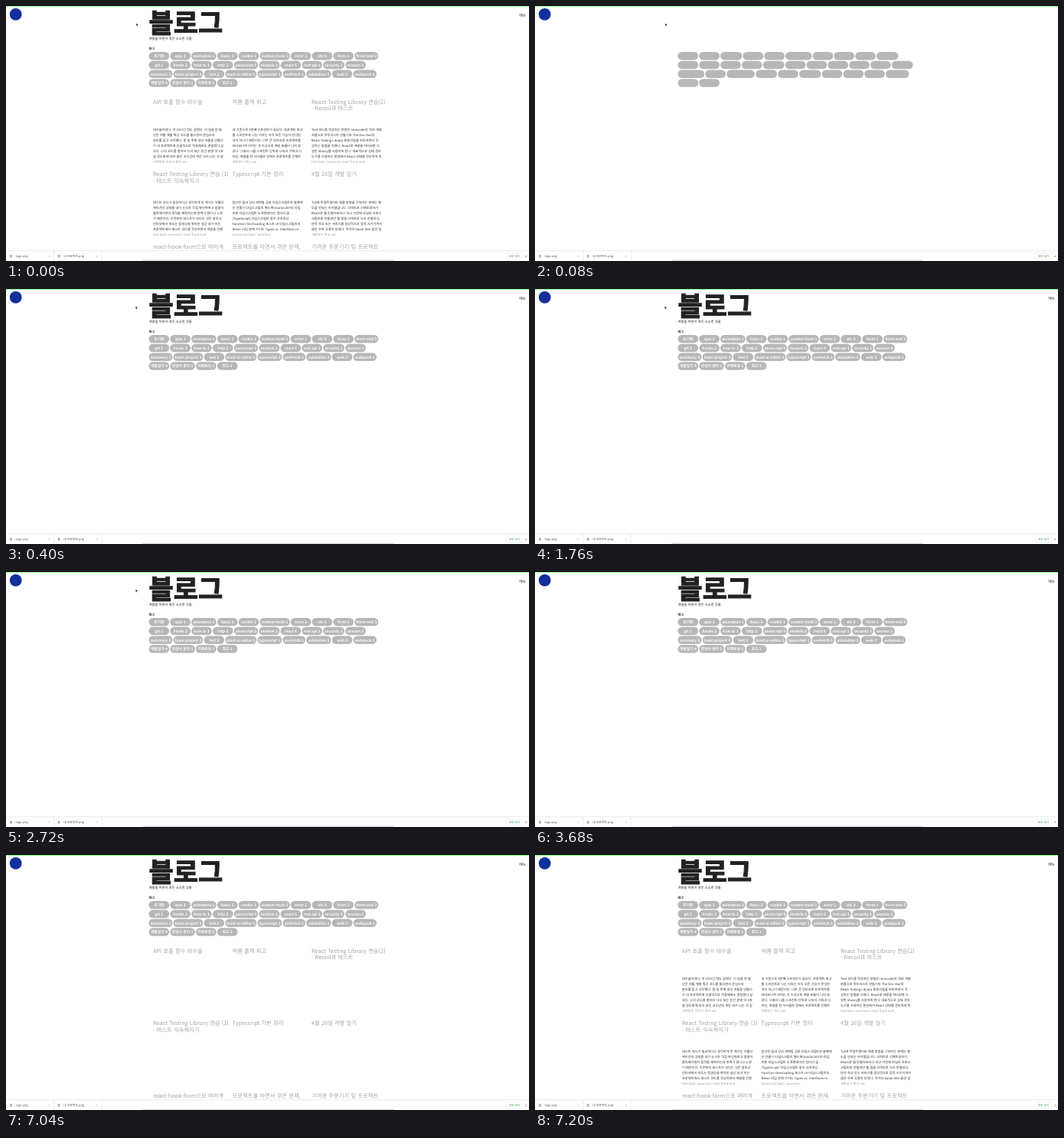
Write an HTML page that moves like this. It is 683 by 333 pixels and loops after 7.52 s.

```html
<!DOCTYPE html>
<html lang="ko">
<head>
<meta charset="utf-8">
<title>블로그</title>
<style>
html, body { margin: 0; width: 100%; height: 100%; overflow: hidden; background: #fff; }
svg { display: block; width: 683px; height: 333px; }
text {
  font-family: "Noto Sans CJK KR", "Noto Sans KR", "Noto Sans CJK", sans-serif;
  text-rendering: geometricPrecision;
  white-space: pre;
}
</style>
</head>
<body>
<svg id="stage" viewBox="0 0 683 333"></svg>
<script>
const LOOP = 7520, STEP = 80;
const columns = [192, 295.5, 399];

const rows = [
  ['초기화', 'ajax 3', 'animation 1', 'basic 3', 'cookie 1', 'custom hook 1', 'error 1', 'etc 8', 'form 1', 'front-end 3'],
  ['git 1', 'hooks 2', 'how to 1', 'http 2', 'javascript 9', 'module 2', 'react 6', 'rest api 1', 'security 1', 'session 1'],
  ['summary 3', 'team project 3', 'test 2', 'toast ui editor 1', 'typescript 1', 'useFetch 1', 'validation 2', 'web 3', 'webpack 1'],
  ['개발일기 4', '관심사 분리 1', '리팩토링 1', '회고 1']
];
// Pill widths by row and index; all others have the minimum width.
const loadedWidths = [
  { 2: 32.6, 5: 39.2, 9: 31.1 },
  { 4: 31.5, 5: 27.1, 8: 28 },
  { 0: 31, 1: 38.8, 3: 41, 4: 32, 5: 29.5, 6: 32.6, 8: 30.4 },
  { 1: 32.6 }
];
const fallbackCounts = [10, 11, 10, 2];
const fallbackWidths = [
  { 2: 28.3, 5: 34.4, 9: 28.4 },
  { 4: 28, 10: 27.8 },
  { 0: 34.8, 2: 36.8, 3: 28, 5: 28.5, 9: 30.5 },
  {}
];

const looseTitles = [
  [['API 호출 함수 대수술'], ['여름 플젝 회고'], ['React Testing Library 연습(2)', '- Recoil과 테스트']],
  [['React Testing Library 연습 (1)', '- 테스트 익숙해지기'], ['Typescript 기본 정리'], ['4월 26일 개발 일기']],
  [['react-hook-form으로 여러개'], ['프로젝트를 하면서 겪은 문제,'], ['가까운 주문기기 팀 프로젝트']]
];
const tightTitles = [
  [['API 호출 함수 대수술'], ['여름 플젝 회고'], ['React Testing Library 연습(2) -', 'Recoil과 테스트']],
  [['React Testing Library 연습 (1) -', '테스트 익숙해지기'], ['Typescript 기본 정리'], ['4월 26일 개발 일기']],
  [['react-hook-form으로 여러개의', '폼'], ['프로젝트를 하면서 겪은 문제,'], ['가까운 주문기기 팀 프로젝트 시']]
];

const bodies = [
  [`대수술이었다. 약 10시간 정도 걸렸다. 이 일을 한 발
단은 여름 개발 특강 코드를 들으면서 관심사의
분리를 듣고 시작했다. 할 일 목록 생성 어플을 만들다
가 내 프로젝트에 단골적으로 적용해봐도 괜찮겠다 싶
었다. 나의 코드를 열어서 다시 보는 순간 분명 약 1개
월 정도밖에 되지 않은 코드인데 썩은 내가 나는 것 같
리팩토링 관심사 분리 set`,
`내 기준으로 3번째 스프린트가 끝났다. 프로젝트 회고
를 스프린트로 나눈 이유는 아직 모든 기능이 완성된
것이 아니기 때문이다. 너무 큰 덩어리로 프로젝트를
바라보니까 지치는 것 이상으로 개발 효율이 나지 않
았다. 그래서 나름 스프린트 단위로 나눠서 기획과 디
자인, 개발을 한 사이클로 정해서 프로젝트를 진행하
개발일기 회고 set`,
`Test 코드를 작성하는 방법은 minicode의 TDD 개발
흐름으로 투두리스트 만들기와 The Dev Owl의
React Testing Library 튜토리얼을 따라하면서 작
성하는 방법을 익혔다. React로 개발을 하다보면 다
양한 library를 사용하게 된다. 대표적으로 상태 관리
도구를 사용하는 환경에서 React 상태를 관리하게 된
test basic summary react front-end`],
  [`테스트 코드가 필요하다고 생각하게 된 계기는 어플리
케이션의 상태를 내가 눈으로 직접 확인하며고 일일이
클릭해가면서 동작을 예측하는데 한계가 왔다고 느꼈
기 때문이다. 이전부터 테스트가 있다는 것은 알았고
인터넷에서 떠도는 동영상을 봤지만 실상 내가 하는
프로젝트에서 테스트 코드를 작성하면서 개발을 진행
test basic summary react front-end`,
`참고한 글과 강의 새벽빛 공방 타입스크립트로 블록체
인 만들기 타입스크립트 핸드북(marlon2075) 타입
추론 타입스크립트 도큐멘테이션 정리의 글
(TypeScript) 타입스크립트 함수 오버로딩 :
Function Overloading 포스트 UI 타입스크립트의
Never 타입 완벽 가이드 Types vs. Interfaces in
typescript basic summary`,
`TLDR 주절주절이라 해결 방법을 구하려는 분께는 별
도움 안되는 아이템입니다. 리액트로 리팩토링하기
React로 웹 만들어보라고 하고 이전에 바닐라 자바스
크립트로 만들었던 웹 앱을 리액트로 다시 만들었다.
만약 하고 있는 서비스를 정상적으로 동작 시키기까지
많은 우여 곡절이 있었다. 쿠키와 Same Site 옵션 일
개발일기 회고 set`]
];

const stage = document.getElementById('stage');

function add(parent, tag, attrs, content) {
  const el = document.createElementNS('http://www.w3.org/2000/svg', tag);
  for (const key in attrs) el.setAttribute(key, attrs[key]);
  if (content) el.textContent = content;
  return parent.appendChild(el);
}
const group = () => add(stage, 'g', {});
const rect = (g, x, y, width, height, fill, more) => add(g, 'rect', { x, y, width, height, fill, ...more });
const line = (g, d, stroke, width = .6) => add(g, 'path', { d, stroke, fill: 'none', 'stroke-width': width });
const label = (g, x, y, size, content, fill, weight = 400, anchor = 'start') =>
  add(g, 'text', { x, y, fill, 'font-size': size, 'font-weight': weight, 'text-anchor': anchor }, content);

function drawPills(g, counts, widths, names) {
  counts.forEach((count, r) => {
    let x = 186.5;
    const y = 60.1 + r * 11.75;
    for (let i = 0; i < count; i++) {
      const w = widths[r][i] || 26.7;
      rect(g, x, y, w, 10.4, '#b7b7b7', { rx: 5.2 });
      if (names) label(g, x + w / 2, y + 6.95, 4.8, names[r][i], '#fff', 700, 'middle');
      x += w + 1.1;
    }
  });
}

function drawTitles(g, titles, size, top, fill) {
  titles.forEach((row, r) => row.forEach((lines, c) => lines.forEach((s, i) =>
    label(g, columns[c], top + r * 94.8 + i * 8.4, size, s, fill, 300))));
}

const fallback = group();
drawPills(fallback, fallbackCounts, fallbackWidths);

const header = group();
const heading = label(header, 186.5, 34.7, 35, '블로그', '#222', 900);
heading.setAttribute('stroke', '#222'); // thickens bold to black weight
heading.setAttribute('stroke-width', 1.1);
label(header, 186.5, 43.6, 4.3, '개발을 하면서 겪은 소소한 것들', '#222');
label(header, 186.5, 57.1, 4.1, '태그', '#222', 700);
label(header, 679, 14, 4.8, '메뉴', '#222', 400, 'end');
drawPills(header, rows.map(r => r.length), loadedWidths, rows);

const tight = group();
drawTitles(tight, tightTitles, 7.03, 126.6, '#a8a8a8');
const loose = group();
drawTitles(loose, looseTitles, 7.35, 127.6, '#a4a4a4');

const text = group();
bodies.forEach((row, r) => row.forEach((body, c) => body.split('\n').forEach((s, i) =>
  label(text, columns[c], 162.9 + r * 95 + i * 6.98, 4.22, s, i < 6 ? '#2c2c2c' : '#999'))));
for (const y of [205.4, 300.4]) rect(text, 187, y, 310, 4, '#fff');

// Page frame and download bar
const chrome = group();
rect(chrome, 0, 0, 683, 1, '#8cf58c');
add(chrome, 'circle', { cx: 12.7, cy: 10.8, r: 7.9, fill: '#12309a' });
rect(chrome, 0, 319.5, 683, 13.5, '#fff');
line(chrome, 'M0 319.7H683M62.7 320V333M125.2 320V333', '#ddd');
[['logo.png', 6.5], ['내 프로젝트.png', 69]].forEach(([name, x]) => {
  rect(chrome, x - 1.2, 325, 2.6, 3.6, '#aaa');
  label(chrome, x + 6, 328.3, 3.9, name, '#555');
  line(chrome, `M${x + 48.8} 327.4l1.1-1.1 1.1 1.1`, '#777', .5);
});
rect(chrome, 654, 322.6, 20.5, 8, '#fff', { rx: 1, stroke: '#e4e4e4', 'stroke-width': .5 });
label(chrome, 664.2, 328.2, 3.7, '모두 보기', '#2a9a2a', 500, 'middle');
line(chrome, 'M678.2 325.8l2 2m0-2l-2 2', '#666', .5);
rect(chrome, 178, 331.8, 329, 3, '#d8d8d8', { rx: 1.2 });

const cursor = add(stage, 'path', {
  d: 'M0 0V3.6L.8 2.9 1.4 4.2 2 3.9 1.4 2.7H2.5Z', fill: '#000', stroke: '#fff', 'stroke-width': .2
});

const show = (el, on) => el.setAttribute('visibility', on ? 'visible' : 'hidden');

function draw(now) {
  const t = Math.floor(now % LOOP / STEP) * STEP;
  const first = t < 80;
  show(fallback, t >= 80 && t < 320);
  show(header, first || t >= 320);
  show(tight, t >= 6880 && t < 6960);
  show(loose, first || t >= 6960);
  show(text, first || t >= 7200);

  // The pointer rests, then leaves through the top edge.
  const leave = Math.max(0, (t - 3120) / 240);
  const x = (t < 320 ? 170.3 : 169.5) - 4.5 * leave;
  cursor.setAttribute('transform', `translate(${x} ${22.4 - 24 * leave})`);
  show(cursor, leave < 1);
  requestAnimationFrame(draw);
}
draw(0);
</script>
</body>
</html>
```
